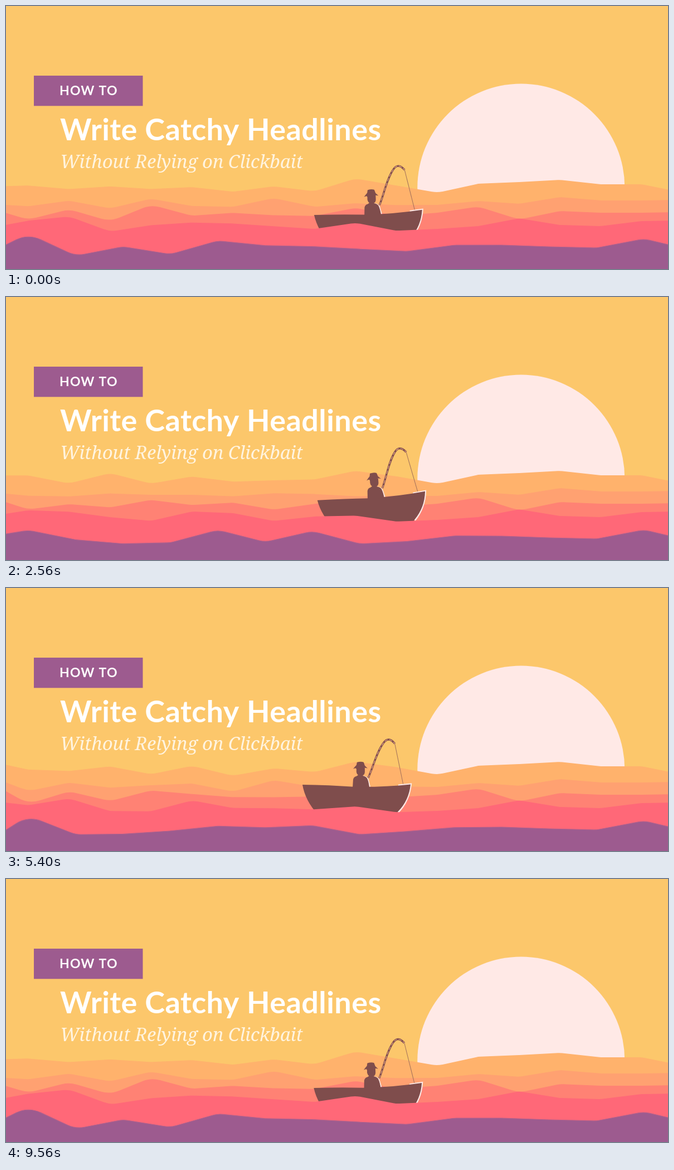
Recreate the animation shown at these times as an HTML page with a canvas. Size 1188 px wide and 472 px high, loop 9.6 s.

```html
<!DOCTYPE html>
<html lang="en">
<head>
<meta charset="utf-8">
<title>Fishing boat at sunset</title>
<style>
  html, body { margin: 0; width: 100%; height: 100%; overflow: hidden; background: #fcc76b; }
  canvas { display: block; }
</style>
</head>
<body>
<canvas id="stage" width="1188" height="472"></canvas>
<script>
const W = 1188, H = 472, LOOP = 9600, STEP = 40;
const ctx = document.getElementById('stage').getContext('2d');
const SKY = '#fcc76b', BROWN = '#7f4d4c', PALE = '#ffe9e6', PURPLE = '#9d5b8f';

// Each ridge rests on evenly spaced heights; a ripple travels along its left half.
const RIPPLE_LENGTH = 2.5;
const swell = { spacing: 73.4, crest: 0.4 };
const hills = { ...swell, color: '#ffb26c', ripple: 4,
  rest: [321, 322, 331, 320, 332, 323, 333, 326, 330, 311, 322, 335, 319, 316, 312, 320, 320, 335] };
const farSwell = { ...swell, color: '#ffa171', ripple: 5.5,
  rest: [354, 359, 353, 358, 351, 356, 360, 348, 357, 356, 357, 357, 350, 355, 343, 349, 349, 348] };
const midSwell = { ...swell, color: '#ff8274', ripple: 4.5,
  rest: [369, 383, 368, 382, 361, 374, 371, 378, 374, 364, 376, 371, 360, 383, 368, 371, 371, 370] };
const nearSwell = { ...swell, color: '#ff6878', ripple: 5,
  rest: [390, 385, 381, 400, 398, 386, 390, 398, 397, 391, 403, 400, 395, 381, 393, 395, 386, 385] };
const foreground = { spacing: 85, crest: 1.9, color: PURPLE, edge: '#b8618a', ripple: 6.5,
  rest: [428, 413, 442, 438, 442, 421, 434, 426, 440, 439, 429, 429, 432, 434, 418, 438] };

const clamp01 = v => Math.min(1, Math.max(0, v));

function ease(time, start, end) {
  const u = clamp01((time - start) / (end - start));
  return u * u * (3 - 2 * u);
}

// Sum of eased moves [delta, start, end] whose deltas cancel out; a move may run past the loop end.
const track = (from, ...moves) => time => moves.reduce((value, [delta, start, end]) =>
  value + delta * (ease(time, start, end) + ease(time + LOOP, start, end)), from);

const boatX = track(560, [28, 7880, 10440], [-28, 2200, 5000]);
const boatY = track(375, [-22, 0, 5400], [22, 6000, 7900]);
const boatTilt = track(-5.9, [-3.5, 9400, 10440], [7.7, 2000, 4300], [-4.2, 4300, 6600]);

// The ripple moves left in three steps, one full wavelength per loop.
const rippleShift = time =>
  1.1 * ease(time, 0, 1000) + 0.7 * ease(time, 4180, 5380) + 0.7 * ease(time, 7900, LOOP);

function drawRidge({ spacing, crest, color, edge, ripple, rest }, time) {
  const shift = rippleShift(time);
  const points = rest.map((y, i) => {
    const phase = 2 * Math.PI * (i - crest + shift) / RIPPLE_LENGTH;
    const strength = ripple * clamp01((10.5 - i) / 4);
    return [Math.max(0, 40 + spacing * (i - 1)), y + strength * Math.cos(phase)];
  });
  const last = points[points.length - 1];
  ctx.beginPath();
  ctx.moveTo(-5, H + 5);
  ctx.lineTo(-5, points[0][1]);
  ctx.lineTo(...points[0]);
  for (let i = 1; i < points.length - 1; i++) ctx.arcTo(...points[i], ...points[i + 1], 50);
  ctx.lineTo(...last);
  ctx.lineTo(last[0], H + 5);
  ctx.fillStyle = color;
  ctx.fill();
  if (edge) {
    ctx.strokeStyle = edge;
    ctx.lineWidth = 1.2;
    ctx.stroke();
  }
}

const hull = new Path2D('M0 0Q50 1 92 4Q145 5 194 0Q191 29 171 49L168 53H27Q5 29 0 0Z');
const bowLight = new Path2D('M172 2L194 0Q191 29 171 50');
const body = new Path2D('M90 6L91 -9Q92 -14 97 -15L100 -17Q96 -20 97 -27L96 -30H112V-23Q112 -18 108 -16Q116 -14 117 -9Q119 -4 120 6Z');
const backLight = new Path2D('M109 -15Q117 -13 118 -8L121 4');
const hat = new Path2D('M98 -40Q105 -42 110 -40L112 -34L117 -29Q112 -31 108 -29Q103 -27 98 -29Q94 -30 91 -28Q94 -32 97 -35Z');
const rod = new Path2D('M118 -12C127 -31 133 -58 146 -75Q155 -87 166 -73');
const fishingLine = new Path2D('M166 -73L181 1');

function stroke(path, color, width, dash = []) {
  ctx.strokeStyle = color;
  ctx.lineWidth = width;
  ctx.setLineDash(dash);
  ctx.stroke(path);
}

function drawBoat(time) {
  ctx.save();
  ctx.translate(boatX(time), boatY(time));
  ctx.rotate(boatTilt(time) * Math.PI / 180);
  stroke(fishingLine, '#a06f5a', 1);
  stroke(bowLight, PALE, 4);
  stroke(backLight, PALE, 2);
  stroke(rod, BROWN, 3.4);
  stroke(rod, '#e3a283', 1.2, [6, 3]);
  ctx.fillStyle = BROWN;
  for (const part of [hull, body, hat]) ctx.fill(part);
  ctx.restore();
}

function drawText(text, x, y, font, color, spacing) {
  ctx.font = font;
  ctx.letterSpacing = spacing + 'px';
  ctx.fillStyle = color;
  ctx.fillText(text, x, y);
}

function draw(time) {
  ctx.fillStyle = SKY;
  ctx.fillRect(0, 0, W, H);

  ctx.fillStyle = PALE;
  ctx.beginPath();
  ctx.arc(924.3, 325.5, 186, 0, 2 * Math.PI);
  ctx.fill();

  for (const ridge of [hills, farSwell, midSwell]) drawRidge(ridge, time);
  drawBoat(time);
  for (const ridge of [nearSwell, foreground]) drawRidge(ridge, time);

  ctx.fillStyle = PURPLE;
  ctx.fillRect(50, 125, 195.5, 54.3);
  drawText('HOW TO', 96, 160, 'bold 23px Lato, sans-serif', '#fff', 1.2);
  drawText('Write Catchy Headlines', 97, 241, 'bold 54px Lato, sans-serif', '#fff', 0.4);
  drawText('Without Relying on Clickbait', 97, 291, 'italic 500 33px "Noto Serif", serif', '#fff4e0', -0.2);
}

function frame() {
  draw(Math.floor(performance.now() / STEP) * STEP % LOOP);
  requestAnimationFrame(frame);
}
frame();
</script>
</body>
</html>
```
